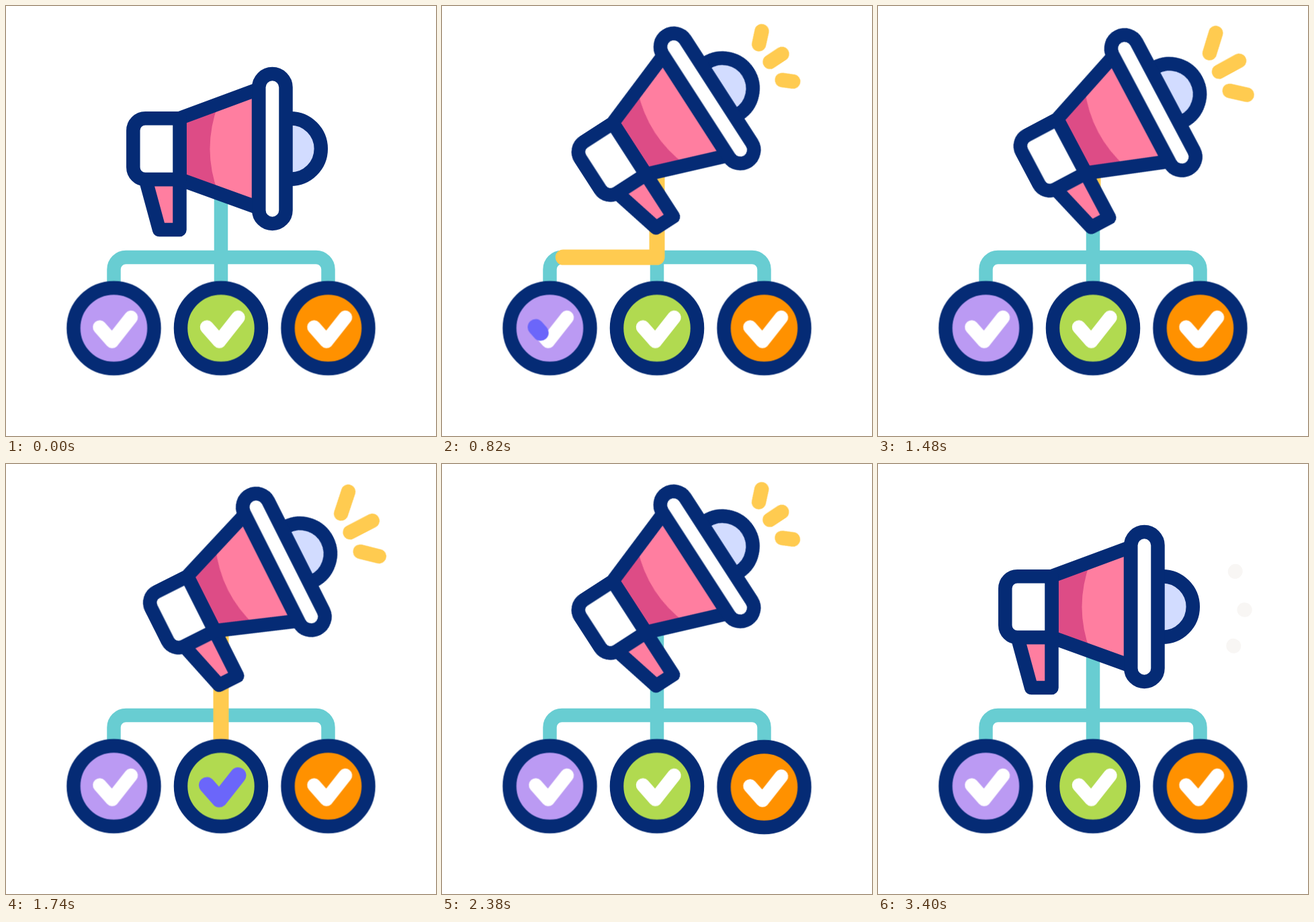
Write an HTML page without scripts that moves like this. It is 640 px wide and 640 px high and loops after 3.6 s.

```html
<!DOCTYPE html>
<html lang="en">
<head>
<meta charset="utf-8">
<title>Megaphone broadcast</title>
<style>
  :root {
    --navy: #052b75; --pink: #ff7ea0; --rose: #dd4c86; --ice: #d2dcff;
    --teal: #68cdd2; --yellow: #ffcb50; --blue: #6b66fa;
  }
  html, body { margin: 0; width: 100%; height: 100%; overflow: hidden; background: #fff; }
  svg { display: block; width: 100%; height: 100%; }
  path, circle, rect { stroke-width: 20.5; stroke-linecap: round; stroke-linejoin: round; }
  .outline { stroke: var(--navy); }
  .wire, .pulse, .check, .tick, .rays { fill: none; }
  .wire { stroke: var(--teal); }
  .check { stroke: #fff; }
  .pulse { stroke: var(--yellow); stroke-width: 23; }
  .tick { stroke: var(--blue); stroke-width: 24; }
  .rays path { stroke-width: 21.5; }

  .tilt, .recoil, .rays, .node, .pulse, .tick {
    animation: 3.6s cubic-bezier(.333, 0, .667, 1) var(--wait, 0s) infinite both;
  }
  .tilt { animation-name: tilt; transform-origin: 268.6px 179.2px; }
  .recoil { animation-name: recoil; transform-origin: 328px 316px; }
  .rays { animation-name: rays; }
  .node { animation-name: drop; }
  .pulse { animation-name: pulse; }
  .tick { animation-name: tick; }
  .second { --wait: 1s; }
  .third { --wait: 2s; }

  @keyframes tilt {
    0%, 88.889%, 100% { transform: rotate(0deg); }
    11.111%, 77.778% { transform: rotate(-33.1deg); }
  }
  @keyframes recoil {
    0%, 11.111%, 22.222%, 33.333%, 44.444%, 55.556%, 66.667%, 77.778%, 100% { transform: rotate(0deg); }
    16.667%, 27.778%, 38.889%, 50%, 61.111%, 72.222% { transform: rotate(8.1deg); }
  }
  /* Rays grow, breathe with the recoil, then shrink to their tips and fade */
  @keyframes rays {
    0%, 11.111% { opacity: 0; stroke: var(--yellow); stroke-dasharray: 1 900; stroke-dashoffset: 0; }
    11.12% { opacity: 1; stroke-dasharray: 1 900; }
    16.667%, 27.778%, 38.889%, 50%, 61.111%, 72.222% { stroke-dasharray: 100 900; }
    22.222%, 33.333%, 44.444%, 55.556%, 66.667%, 77.778% { stroke-dasharray: 50 900; }
    83.333% { stroke-dasharray: 100 900; stroke-dashoffset: 0; }
    88.889% { stroke: var(--yellow); stroke-dasharray: 2 900; stroke-dashoffset: -98; }
    94.444%, 100% { opacity: 1; stroke: #f8f6f4; stroke-dasharray: 2 900; stroke-dashoffset: -98; }
  }
  @keyframes drop {
    0%, 11.111%, 100% { transform: translateY(0); }
    5.556% { transform: translateY(52.5px); }
  }
  @keyframes pulse {
    0%, 11.111%, 27.778%, 100% { stroke-dasharray: 0 900; }
    16.667%, 21.111% { stroke-dasharray: 100 900; }
  }
  @keyframes tick {
    0%, 16.1% { opacity: 0; stroke-dasharray: 1 900; }
    16.11% { opacity: 1; stroke-dasharray: 1 900; }
    18.9%, 21.111% { opacity: 1; stroke-dasharray: 100 900; }
    23.333% { opacity: 1; stroke-dasharray: 1 900; }
    23.34%, 100% { opacity: 0; stroke-dasharray: 1 900; }
  }
</style>
</head>
<body>
<svg viewBox="0 0 640 640">
  <g class="wire">
    <path d="M160.5 500V392a18 18 0 0 1 18-18H461.5a18 18 0 0 1 18 18V500"/>
    <path d="M320 215V500"/>
  </g>

  <path class="pulse" pathLength="100" d="M320 212V374H178.5a18 18 0 0 0-18 18V420"/>
  <path class="pulse second" pathLength="100" d="M320 212V420"/>
  <path class="pulse third" pathLength="100" d="M320 212V374H461.5a18 18 0 0 1 18 18V420"/>

  <g transform="translate(160.5 479.5)">
    <g class="node">
      <circle class="outline" r="60" fill="#bb9af3"/>
      <path class="check" d="M-21-1.5L-2.5 19.5L25.5-16"/>
      <path class="tick" pathLength="100" d="M-21-1.5L-2.5 19.5L25.5-16"/>
    </g>
  </g>
  <g class="second" transform="translate(320 479.5)">
    <g class="node">
      <circle class="outline" r="60" fill="#b1da50"/>
      <path class="check" d="M-21-1.5L-2.5 19.5L25.5-16"/>
      <path class="tick" pathLength="100" d="M-21-1.5L-2.5 19.5L25.5-16"/>
    </g>
  </g>
  <g class="third" transform="translate(479.5 479.5)">
    <g class="node">
      <circle class="outline" r="60" fill="#ff9100"/>
      <path class="check" d="M-21-1.5L-2.5 19.5L25.5-16"/>
      <path class="tick" pathLength="100" d="M-21-1.5L-2.5 19.5L25.5-16"/>
    </g>
  </g>

  <g class="recoil">
    <g class="tilt">
      <g class="rays">
        <path pathLength="100" d="M505 186.5L532 159.5"/>
        <path pathLength="100" d="M504.5 217.5L546 217"/>
        <path pathLength="100" d="M505 250L529.5 271"/>
      </g>
      <circle class="outline" cx="423.5" cy="212.5" r="45.3" fill="var(--ice)"/>
      <path class="outline" fill="var(--pink)" d="M207.7 258L228.1 333H258.5V258Z"/>
      <path fill="var(--pink)" d="M258.5 167L376 123.5V300.5L258.5 258Z"/>
      <path fill="var(--rose)" d="M258.5 167L316 146Q291 212.5 316 279L258.5 258Z"/>
      <path class="outline" fill="none" d="M258.5 167L376 123.5V300.5L258.5 258Z"/>
      <path class="outline" fill="#fff" d="M258.5 167.3H207.3a18 18 0 0 0-18 18V240a18 18 0 0 0 18 18H258.5Z"/>
      <rect class="outline" fill="#fff" x="376.3" y="101" width="40.2" height="223" rx="20.1"/>
    </g>
  </g>
</svg>
</body>
</html>
```
